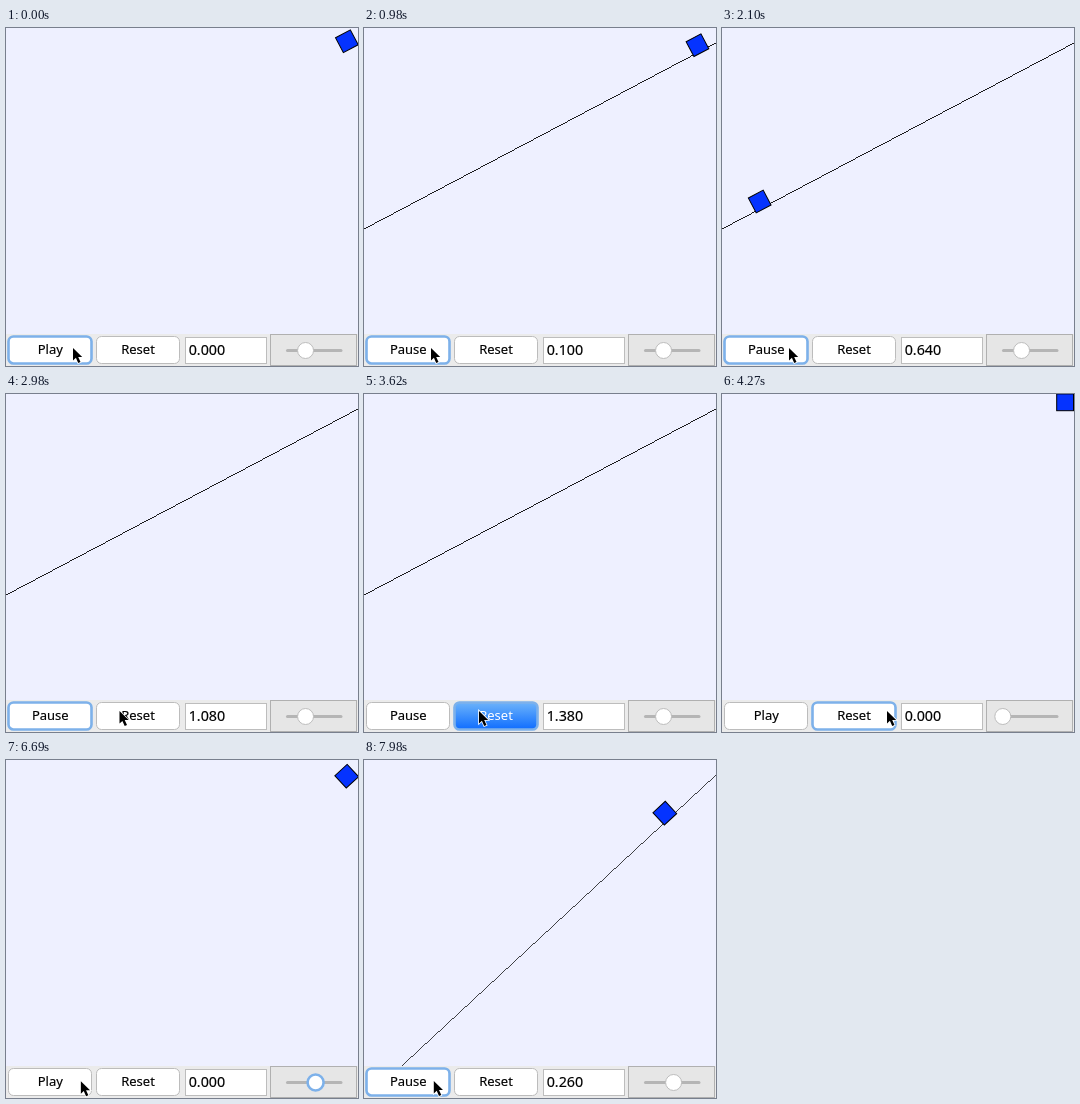
Write an HTML page that moves like this. It is 352 px wide and 338 px high and loops after 8000 ms.

```html
<!DOCTYPE html>
<html lang="en">
<head>
<meta charset="utf-8">
<title>Sliding block</title>
<style>
  html, body { margin: 0; overflow: hidden; background: #eef0ff; }
  svg { display: block; }
  text { font: 13px "Noto Sans", sans-serif; fill: #000; stroke: #000; stroke-width: .15; }
  .button text { text-anchor: middle; }
  .button rect { fill: #fff; stroke: #bcbcbc; }
  .button.focused rect { stroke: #7db1ea; stroke-width: 2.6; }
  .button.pressed rect { fill: url(#down); }
  .button.pressed text { fill: #fff; stroke: none; }
  #clock { font-size: 14.3px; }
  #thumb { fill: #fff; stroke: #bdbdbd; }
  #thumb.focused { stroke: #7db1ea; stroke-width: 2.6; }
</style>
</head>
<body>
<svg width="352" height="338" viewBox="0 0 352 338">
  <linearGradient id="down" x2="0" y2="1">
    <stop stop-color="#6cb3fa"/><stop offset="1" stop-color="#0f6dff"/>
  </linearGradient>
  <rect width="352" height="338" fill="#eef0ff"/>
  <line id="ramp" x1="352" y1="15" stroke="#000" shape-rendering="crispEdges"/>
  <rect id="block" x="-8.4" y="-8.4" width="16.8" height="16.8" fill="#0533ff" stroke="#000"/>

  <rect y="306" width="352" height="32" fill="#ebebeb"/>
  <g id="play" class="button">
    <rect x="2.5" y="308.5" width="83" height="27" rx="5"/><text x="44.3" y="326">Play</text>
  </g>
  <g id="reset" class="button">
    <rect x="90.5" y="308.5" width="83" height="27" rx="5"/><text x="132" y="326">Reset</text>
  </g>
  <rect x="179.5" y="309.5" width="81" height="26" fill="#fff" stroke="#bdbdbd"/>
  <text id="clock" x="182.7" y="327">0.000</text>
  <rect x="264.5" y="306.5" width="86" height="31" fill="#e6e6e6" stroke="#b0b0b0"/>
  <path d="M281.5 322.5H335" stroke="#b5b5b5" stroke-width="3" stroke-linecap="round"/>
  <circle id="thumb" cy="322.5" r="8"/>
  <path id="cursor" d="M0 0V12.5L2.9 9.8 5.2 15 7.5 14 5.2 9H9.2Z" stroke="#fff" stroke-width="1.6" paint-order="stroke"/>
</svg>
<script>
const LOOP = 8000, STEP = 80;
const RESET = 3700, RUNS = [820, 7500];
// Spans of activity; the picture rests between them.
const spans = [[0, 0], [580, 580], [820, 4020], [4270, 4830], [5080, 5480], [5890, 6930], [7090, 7090], [7500, 7980]];
const $ = id => document.getElementById(id);

function snap(ms) {
  const [start, end] = spans.filter(s => s[0] <= ms).pop();
  return Math.min(end, start + Math.floor((ms - start) / STEP) * STEP);
}

function clockAt(t) {
  const start = t < RESET ? RUNS[0] : RUNS[1];
  return t < start ? 0 : Math.round((t - start) / 41 + 0.95) / 50;
}

function setButton(id, focused, pressed) {
  $(id).classList.toggle("focused", focused);
  $(id).classList.toggle("pressed", pressed);
}

function draw(ms) {
  const t = snap(ms), clock = clockAt(t), running = clock > 0;
  const within = (a, b) => t >= a && t < b;
  const part = (a, b) => Math.min(1, Math.max(0, (t - a) / (b - a)));
  const glide = (a, b) => 1 - (1 - part(a, b)) ** 2.5;

  const drag = 28.8 * part(5040, 5480);
  const tilt = t < RESET ? 18.75 : drag;
  const degrees = tilt * 1.486, angle = degrees * Math.PI / 180;
  const cos = Math.cos(angle), sin = Math.sin(angle);

  const accel = 1797 - 4.4 * degrees;
  const slide = 8.9 + accel * clock * clock / 2, lift = 7;
  const x = 352 - slide * cos - lift * sin;
  const y = 15.3 + slide * sin - lift * cos;
  $("block").setAttribute("transform", `translate(${x} ${y}) rotate(${-degrees})`);

  const ramp = $("ramp");
  ramp.setAttribute("x2", 352 - 500 * cos);
  ramp.setAttribute("y2", 15 + 500 * sin);
  ramp.setAttribute("stroke-width", cos);
  ramp.style.display = running ? "" : "none";

  setButton("play", t < 3540 || t >= 7090, within(580, RUNS[0]) || within(7090, RUNS[1]));
  setButton("reset", within(3540, 5080), within(3540, RESET));
  $("play").lastElementChild.textContent = running ? "Pause" : "Play";
  $("clock").textContent = clock.toFixed(3);
  $("thumb").setAttribute("cx", 280.8 + tilt);
  $("thumb").classList.toggle("focused", within(5080, 7090));

  // To Reset, off it, to the slider, then back to Play.
  const a = glide(2500, 3140), b = glide(RESET, 4270), c = part(4270, 4830), d = glide(5810, 6930);
  const px = 67 + 48 * a + 50 * b + 114 * c + drag - 238 * d;
  const py = 320 - 3 * a + 10 * c - 6 * d;
  $("cursor").setAttribute("transform", `translate(${px} ${py})`);
}

function tick() {
  draw(performance.now() % LOOP);
  requestAnimationFrame(tick);
}
tick();
</script>
</body>
</html>
```
